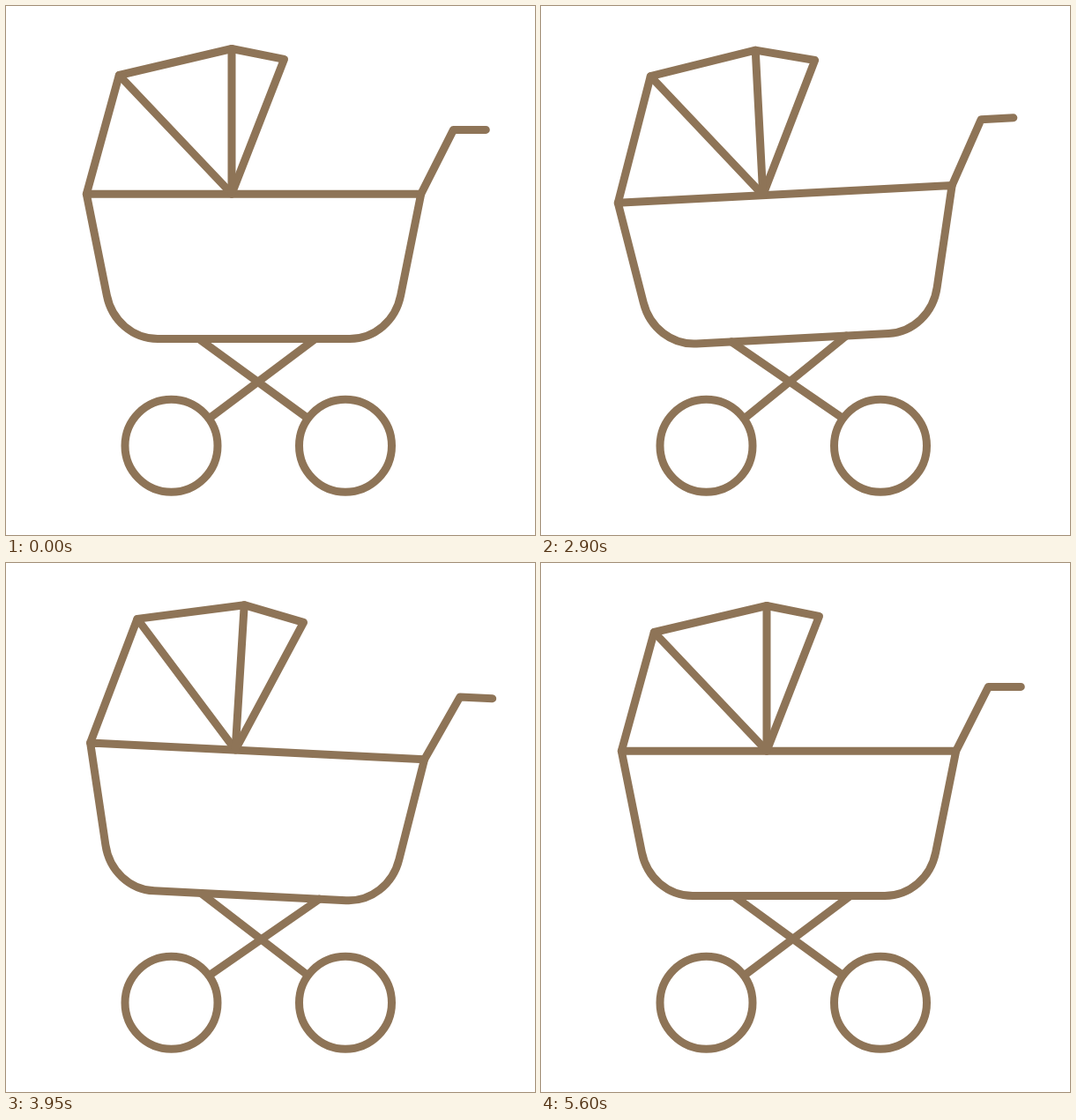
Animation of 600 by 600 pixels, one loop 5630 ms. Source, as an HTML page with a canvas:

```html
<!DOCTYPE html>
<html lang="en">
<head>
<meta charset="utf-8">
<title>Pram</title>
<style>
  html, body { margin: 0; width: 100%; height: 100%; overflow: hidden; background: #fff; }
  canvas { display: block; width: 600px; height: 600px; }
</style>
</head>
<body>
<canvas id="stage" width="600" height="600"></canvas>
<script>
const ctx = document.getElementById('stage').getContext('2d');
const LOOP = 5630, MOVE_START = 2030, STEP = 30;
const CENTER = [281, 295];
const HINGE = [256, 213];

// [time, body angle in degrees]
const ROCK = [
  [2000, [0]], [2300, [-3]], [2600, [3]], [2900, [-3]], [3200, [3]],
  [3500, [-3]], [3900, [3]], [4400, [-2]], [4900, [0]]
];

// Angles of the rear, middle and front hood ribs; the hood lags behind the body
const REST = [0, 0, 0];
const OPEN = [6.2, 2.7, 8.1];
const SHUT = [-5.8, -7.6, -12.4];
const HOOD = [
  [2000, REST], [2200, OPEN], [2500, SHUT], [2800, OPEN], [3100, SHUT], [3400, OPEN],
  [3700, SHUT], [4050, OPEN], [4600, [-4.2, -6.9, -10]], [5100, [1.2, 0.5, 1.9]], [5600, REST]
];
const RIBS = [[128.3, 78.5], [256, 48.5], [315.5, 60.3]];

const rad = deg => deg * Math.PI / 180;
const ease = u => u * u * (3 - 2 * u);

function sample(keys, t) {
  if (t <= keys[0][0]) return keys[0][1];
  const next = keys.findIndex(key => key[0] > t);
  if (next < 0) return keys[keys.length - 1][1];
  const [t0, from] = keys[next - 1], [t1, to] = keys[next];
  const u = ease((t - t0) / (t1 - t0));
  return from.map((v, i) => v + (to[i] - v) * u);
}

function rotate([x, y], [cx, cy], deg) {
  const c = Math.cos(rad(deg)), s = Math.sin(rad(deg));
  const dx = x - cx, dy = y - cy;
  return [cx + dx * c - dy * s, cy + dx * s + dy * c];
}

function line(...points) {
  ctx.beginPath();
  points.forEach(p => ctx.lineTo(...p));
  ctx.stroke();
}

function wheel(x) {
  ctx.beginPath();
  ctx.arc(x, 498.7, 52.5, 0, Math.PI * 2);
  ctx.stroke();
}

// Strut tops slide along the basket's bottom edge
function strut(topX, lean, angle, foot) {
  const x = topX + lean * angle;
  line([x, 377.4 + (x - CENTER[0]) * Math.sin(rad(angle))], foot);
}

function basket() {
  ctx.beginPath();
  ctx.moveTo(91.3, 213.3);
  ctx.lineTo(114.3, 328);
  ctx.bezierCurveTo(120, 357, 144, 377.4, 172, 377.4);
  ctx.lineTo(390, 377.4);
  ctx.bezierCurveTo(418, 377.4, 442, 357, 447.7, 328);
  ctx.lineTo(470.7, 213.3);
  ctx.closePath();
  ctx.stroke();
  line([470.7, 213.3], [507.5, 140.4], [544.3, 140.4]);
}

function hood(angles) {
  const tips = RIBS.map((tip, i) => rotate(tip, HINGE, angles[i]));
  line([91.3, 213.3], ...tips, HINGE);
  line(tips[0], HINGE);
  line(tips[1], HINGE);
}

function draw(t) {
  const [angle] = sample(ROCK, t);
  ctx.fillStyle = '#fff';
  ctx.fillRect(0, 0, 600, 600);
  ctx.strokeStyle = '#8e7457';
  ctx.lineWidth = 9;
  ctx.lineCap = ctx.lineJoin = 'round';

  wheel(187.5);
  wheel(385);
  strut(218.5, 0.9, angle, [341.5, 467]);
  strut(351, 1.6, angle, [232, 466.7]);

  ctx.save();
  ctx.translate(...CENTER);
  ctx.rotate(rad(angle));
  ctx.translate(-CENTER[0], -CENTER[1]);
  basket();
  hood(sample(HOOD, t));
  ctx.restore();
}

function frame(now) {
  const t = now % LOOP;
  draw(t < MOVE_START ? 0 : MOVE_START + Math.floor((t - MOVE_START) / STEP) * STEP);
  requestAnimationFrame(frame);
}

draw(0);
requestAnimationFrame(frame);
</script>
</body>
</html>
```
